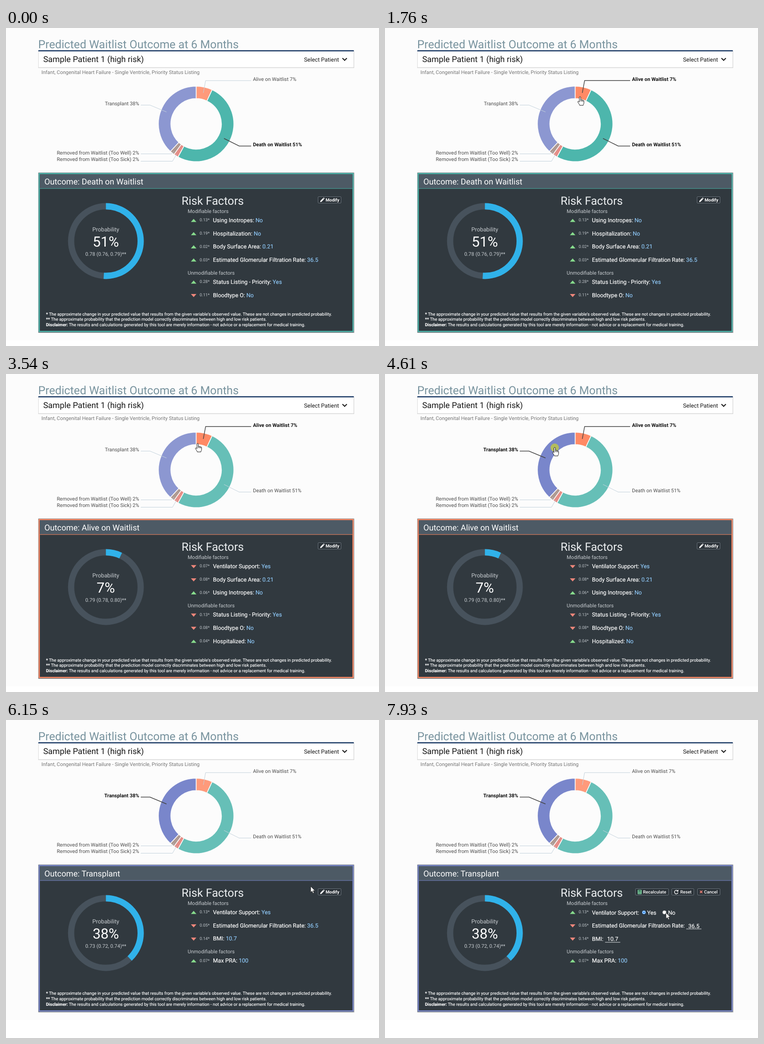
Animation, 811 px wide and 691 px high, one loop 8000 ms. Source, as an HTML page:

```html
<!DOCTYPE html>
<html lang="en">
<head>
<meta charset="utf-8">
<title>Waitlist outcome</title>
<style>
  html, body { margin: 0; width: 100%; height: 100%; overflow: hidden; background: #fff; }
  svg { display: block; width: 811px; height: 691px; font-family: Roboto, sans-serif; text-rendering: geometricPrecision; }
  text { white-space: pre; }
  .slice { stroke: #fcfcfc; stroke-width: 1.6; fill-opacity: .85; }
  .slice.on { fill-opacity: 1; }
  .label text { font-size: 10.93px; fill: #4c4c4c; }
  .label path { fill: none; stroke: #c3d2dc; stroke-width: 1; }
  .label.on text { font-weight: 700; fill: #111; }
  .label.on path { stroke: #444; stroke-width: 1.4; }
  .row { font-size: 12.35px; fill: #fff; stroke: #fff; stroke-width: .2; }
  .row tspan { fill: #90caf9; stroke: #90caf9; }
  .weight { font-size: 9.1px; fill: #c0c6cb; }
  .group { font-size: 11px; fill: #c8cdd1; }
  .note { font-size: 9.4px; fill: #fff; stroke: #fff; stroke-width: .15; }
  .note tspan { font-weight: 700; }
  .frame { fill: #2b3238; stroke: #69727a; }
  .button text { font-size: 9.65px; font-weight: 500; fill: #fff; }
  #modify text { font-size: 9.5px; font-weight: 700; }
</style>
</head>
<body>
<svg id="stage" viewBox="0 0 811 691"></svg>
<script>
const LOOP = 8000, STEP = 77.2, START = 130;
const stage = document.getElementById('stage');

const text = (x, y, s, attrs = '') => `<text x="${x}" y="${y}" ${attrs}>${s}</text>`;
const rect = (x, y, w, h, fill, attrs = '') =>
  `<rect x="${x}" y="${y}" width="${w}" height="${h}" fill="${fill}" ${attrs}/>`;
const path = (d, attrs = '') => `<path d="${d}" ${attrs}/>`;
const style = (size, fill, more = '') => `font-size="${size}" fill="${fill}" ${more}`;

// Donut
const CX = 413.4, CY = 208.4, OUTER = 82, INNER = 55;
const slices = [
  { name: 'Alive on Waitlist', share: 7, color: '#ff8a65', line: 'M429 141L434 114.3H533', x: 537, y: 114.7 },
  { name: 'Death on Waitlist', share: 51, color: '#4db6ac', line: 'M474 240L507 256.5H533', x: 537, y: 256.7 },
  { name: 'Removed from Waitlist (Too Sick)', share: 2, color: '#e07a72', line: 'M371 274L362 289.5H293', x: 289.5, y: 289.3 },
  { name: 'Removed from Waitlist (Too Well)', share: 2, color: '#a1887f', line: 'M365 268L360 273.5H293', x: 289.5, y: 274.7 },
  { name: 'Transplant', share: 38, color: '#7986cb', line: 'M349 182.5L313 167.5H293', x: 289.5, y: 168 }
];

function polar(r, share) {
  const a = share / 50 * Math.PI;
  return `${(CX + r * Math.sin(a)).toFixed(2)} ${(CY - r * Math.cos(a)).toFixed(2)}`;
}

function donut() {
  let from = 0, shapes = '', labels = '';
  slices.forEach((s, i) => {
    const to = from + s.share, big = s.share > 50 ? 1 : 0;
    shapes += path(`M${polar(OUTER, from)}A${OUTER} ${OUTER} 0 ${big} 1 ${polar(OUTER, to)}` +
      `L${polar(INNER, to)}A${INNER} ${INNER} 0 ${big} 0 ${polar(INNER, from)}Z`,
      `class="slice part${i}" fill="${s.color}"`);
    const anchor = s.x < CX ? 'text-anchor="end"' : '';
    labels += `<g class="label part${i}">${path(s.line)}${text(s.x, s.y, `${s.name} ${s.share}%`, anchor)}</g>`;
    from = to;
  });
  return shapes + labels;
}

// Outcome panels; each factor is [signed weight, label, value]
const outcomes = [
  { slice: 1, range: '0.78 (0.76, 0.79)', bottom: 661,
    open: [['+0.13', 'Using Inotropes', 'No'], ['+0.19', 'Hospitalization', 'No'],
      ['+0.02', 'Body Surface Area', '0.21'], ['+0.03', 'Estimated Glomerular Filtration Rate', '36.5']],
    fixed: [['+0.28', 'Status Listing - Priority', 'Yes'], ['-0.11', 'Bloodtype O', 'No']] },
  { slice: 0, range: '0.79 (0.78, 0.80)', bottom: 661,
    open: [['-0.07', 'Ventilator Support', 'Yes'], ['-0.08', 'Body Surface Area', '0.21'], ['+0.06', 'Using Inotropes', 'No']],
    fixed: [['-0.13', 'Status Listing - Priority', 'Yes'], ['-0.08', 'Bloodtype O', 'No'], ['+0.04', 'Hospitalized', 'No']] },
  { slice: 4, range: '0.73 (0.72, 0.74)', bottom: 633.7,
    open: [['+0.13', 'Ventilator Support', 'Yes'], ['-0.05', 'Estimated Glomerular Filtration Rate', '36.5'], ['-0.14', 'BMI', '10.7']],
    fixed: [['+0.07', 'Max PRA', '100']] }
];

const FIRST_ROW = 417.5, PITCH = 28.7;

function factors(list, y, cls) {
  return list.map(([weight, label, value], i) => {
    const c = y + i * PITCH, up = weight[0] === '+';
    const mark = up ? `M402 ${c + 4}L408 ${c - 2.8}L414 ${c + 4}Z` : `M402 ${c - 2.2}L408 ${c + 4.6}L414 ${c - 2.2}Z`;
    return path(mark, `fill="${up ? '#87dc8d' : '#ef877b'}"`) +
      text(421, c + 2.9, weight.slice(1) + '*', 'class="weight"') +
      `<g class="${cls}">${text(450, c + 4.4, `${label}: <tspan>${value}</tspan>`, 'class="row"')}</g>`;
  }).join('');
}

function panel(o, i) {
  const { name, share, color } = slices[o.slice], b = o.bottom;
  const head = FIRST_ROW + (o.open.length - 1) * PITCH + 28.2;
  const mid = 'text-anchor="middle"';
  return `<g id="panel${i}">` +
    rect(0, 0, 811, b + 18, '#fcfcfc') +
    rect(70, 314, 688, b - 312, '#000', 'fill-opacity=".12" rx="1"') +
    rect(70.3, 314.3, 686.2, b - 313.3, '#666e72') +
    rect(71, 315, 684.8, b - 315.3, color) +
    rect(73.5, 317.7, 679.8, b - 320.5, '#31393f') +
    rect(73.5, 317.7, 679.8, 30.6, '#4d5a65') + rect(73.5, 348.3, 679.8, 1, color) +
    text(83.5, 339.5, 'Outcome: ' + name, style(17.8, '#fff')) +
    text(217, 441.7, 'Probability', style(12.35, '#c8cdd1', mid)) +
    text(217, 475, share + '%', style(30.8, '#fff', mid)) +
    text(217, 495.3, o.range + '**', style(11, '#c8cdd1', mid)) +
    text(381.8, 383.6, 'Risk Factors', style(24.7, '#eceff1')) +
    text(395, 401.5, 'Modifiable factors', 'class="group"') +
    factors(o.open, FIRST_ROW, 'open') +
    text(395, head + 4, 'Unmodifiable factors', 'class="group"') +
    factors(o.fixed, head + 19.7, 'fixed') +
    text(87, b - 36.4, "<tspan>*</tspan> The approximate change in your predicted value that results from the given variable's observed value. These are not changes in predicted probability.", 'class="note"') +
    text(87, b - 24.9, '<tspan>**</tspan> The approximate probability that the prediction model correctly discriminates between high and low risk patients.', 'class="note"') +
    text(87, b - 12.8, '<tspan>Disclaimer:</tspan> The results and calculations generated by this tool are merely information - not advice or a replacement for medical training.', 'class="note"') +
    '</g>';
}

// Buttons and form fields
const button = (x, w, tx, label, icon) =>
  `<g class="button">${rect(x + .5, 366.5, w - 1, 14, '', 'class="frame" rx="1.5"')}${icon}${text(tx, 377.1, label)}</g>`;

const pencil = path('M683 378.3L683.6 375.4L689.2 369.8L691.5 372.1L685.9 377.7ZM689.8 369.2L690.8 368.3L693 370.5L692.1 371.5Z', 'fill="#fff"');
const calculator = rect(549.5, 369, 8.5, 9.5, '#7fd6a4', 'rx="1"') + rect(551, 370.3, 5.5, 2, '#24493a') +
  path('M551 374.3H556.6M551 376.6H556.6', 'stroke="#24493a" stroke-width="1.2" stroke-dasharray="1.3 .8"');
const turn = path('M636.3 371.4A3.9 3.9 0 1 0 637 375', 'fill="none" stroke="#fff" stroke-width="1.4"') +
  path('M637.8 368.6V372.8H633.6Z', 'fill="#fff"');
const cross = path('M684.8 370.9L690 376.1M690 370.9L684.8 376.1', 'stroke="#ec8076" stroke-width="1.8"');

const form = '<g id="form">' +
  button(544, 73, 561, 'Recalculate', calculator) + button(623, 49, 642, 'Reset', turn) + button(679, 50, 693.7, 'Cancel', cross) +
  ['Ventilator Support:', 'Estimated Glomerular Filtration Rate:', 'BMI:']
    .map((s, i) => text(450, FIRST_ROW + 5.2 + i * PITCH, s, 'class="row"')).join('') +
  text(570, 422.5, 'Yes', 'class="row"') + text(615.5, 422.5, 'No', 'class="row"') +
  text(659.5, 451.5, '36.5', 'class="row"') + text(483, 480.2, '10.7', 'class="row"') +
  rect(655, 453.5, 33, 1, '#e4e7e9') + rect(478.5, 482.5, 33, 1, '#e4e7e9') +
  '<circle cx="563" cy="418" r="3.7" fill="#fff" stroke="#1a7ff0"/><circle cx="563" cy="418" r="2.1" fill="#1a7ff0"/>' +
  '<circle cx="607.5" cy="418" r="4" fill="#fff" stroke="#8a8a8a" stroke-width=".6"/></g>';

const header =
  text(70, 44.3, 'Predicted Waitlist Outcome at 6 Months', style(24.65, '#78939e')) +
  rect(70, 50, 687, 36.8, '#d2d2d2') + rect(70.8, 50, 685, 35.5, '#fff') + rect(70.3, 48.2, 686, 2.6, '#1f3d68') +
  text(81, 74.4, 'Sample Patient 1 (high risk)', style(17.85, '#161616')) +
  text(648, 72.6, 'Select Patient', style(12.38, '#161616')) +
  path('M731.5 65.5L736.3 70.3L741.1 65.5', 'fill="none" stroke="#161616" stroke-width="2"') +
  text(77, 99.5, 'Infant, Congenital Heart Failure - Single Ventricle, Priority Status Listing', style(10.97, '#757575'));

const ringAttrs = 'cx="217.2" cy="463" r="75.6" fill="none" stroke-width="13.6"';
const ring = `<circle ${ringAttrs} stroke="#47525c"/>` +
  `<circle id="arc" ${ringAttrs} stroke="#30b2ea" pathLength="100" transform="rotate(-90 217.2 463)"/>`;

const pointer = '<g id="cursor" stroke-linejoin="round">' +
  '<circle id="click" r="9" fill="#c4cc3e" fill-opacity=".78"/>' +
  path('M0 0V13L3 10.2L5 15L7.2 14L5.2 9.4H9.2Z', 'id="arrow" fill="#fff" stroke="#222" stroke-width=".8"') +
  path('M-1.5 .8C-1.5 -1 1.5 -1 1.5 .8V6.5C1.5 5.2 4 5.2 4 6.8C4 5.8 6.4 5.9 6.4 7.4C6.5 6.7 8.5 7 8.5 8.6V12.5' +
    'C8.5 15 7 16 7 18H-.8C-1 16 -4 12.5 -4.8 10.8C-5.2 9.4 -3.6 8.6 -2.6 9.8L-1.5 11ZM1.5 6.5V9.5M4 6.8V9.8M6.4 7.4V10',
    'id="hand" fill="#fff" stroke="#111" stroke-width="1"') + '</g>';

stage.innerHTML = outcomes.map(panel).join('') + header + donut() + ring +
  `<g id="modify">${button(678, 51, 695, 'Modify', pencil)}</g>` + form + pointer;

// Motion: [from, to, x, y]
const moves = [
  [130, 910, 465, 230], [910, 1595, 425, 151], [1740, 1750, 424, 150], [3380, 4000, 369, 160],
  [5080, 6300, 673.5, 369], [6300, 6383, 713, 370], [7175, 7930, 611, 418.7]
];
const clicks = [[2370, 2460], [4610, 4690], [6460, 6610]];
const SWEEP = 750, sweeps = [-SWEEP, 2460, 4684];

const $ = id => document.getElementById(id);
const show = (el, on) => { el.style.display = on ? '' : 'none'; };
const clamp = v => Math.max(0, Math.min(1, v));
const sine = v => (1 - Math.cos(Math.PI * v)) / 2;
const cubic = v => v < .5 ? 4 * v ** 3 : 1 - 4 * (1 - v) ** 3;

function cursorAt(t) {
  let x = 753, y = 666;
  for (const [from, to, tx, ty] of moves) {
    const k = sine(clamp((t - from) / (to - from)));
    x += (tx - x) * k;
    y += (ty - y) * k;
  }
  return [x, y];
}

function isLink(x, y) {
  const d = Math.hypot(x - CX, y - CY);
  return d > INNER && d < OUTER || x > 677 && x < 730 && y > 366 && y < 381;
}

function render(t) {
  const tick = t < START ? 0 : START + STEP * Math.floor((t - START + 10) / STEP);
  const current = t < 2460 ? 0 : t < 4685 ? 1 : 2;
  const editing = t >= 6610;

  outcomes.forEach((o, i) => show($('panel' + i), i === current));
  const active = [t >= 1440 && current < 2, current === 0, false, false, t >= 3600];
  active.forEach((on, i) =>
    stage.querySelectorAll('.part' + i).forEach(el => el.classList.toggle('on', on)));

  const amount = slices[outcomes[current].slice].share * cubic(clamp((tick - sweeps[current]) / SWEEP));
  $('arc').setAttribute('stroke-dasharray', `${amount} 200`);
  show($('arc'), amount > 0);

  show($('modify'), !editing);
  show($('form'), editing);
  stage.querySelectorAll('#panel2 .open').forEach(el => show(el, !editing));

  const [x, y] = cursorAt(tick), link = isLink(x, y);
  show($('cursor'), t >= START);
  $('cursor').setAttribute('transform', `translate(${x.toFixed(1)} ${y.toFixed(1)})`);
  show($('hand'), link);
  show($('arrow'), !link);
  show($('click'), clicks.some(([from, to]) => t >= from && t < to));
}

const begin = performance.now();
function frame() {
  render((performance.now() - begin) % LOOP);
  requestAnimationFrame(frame);
}
frame();
</script>
</body>
</html>
```
